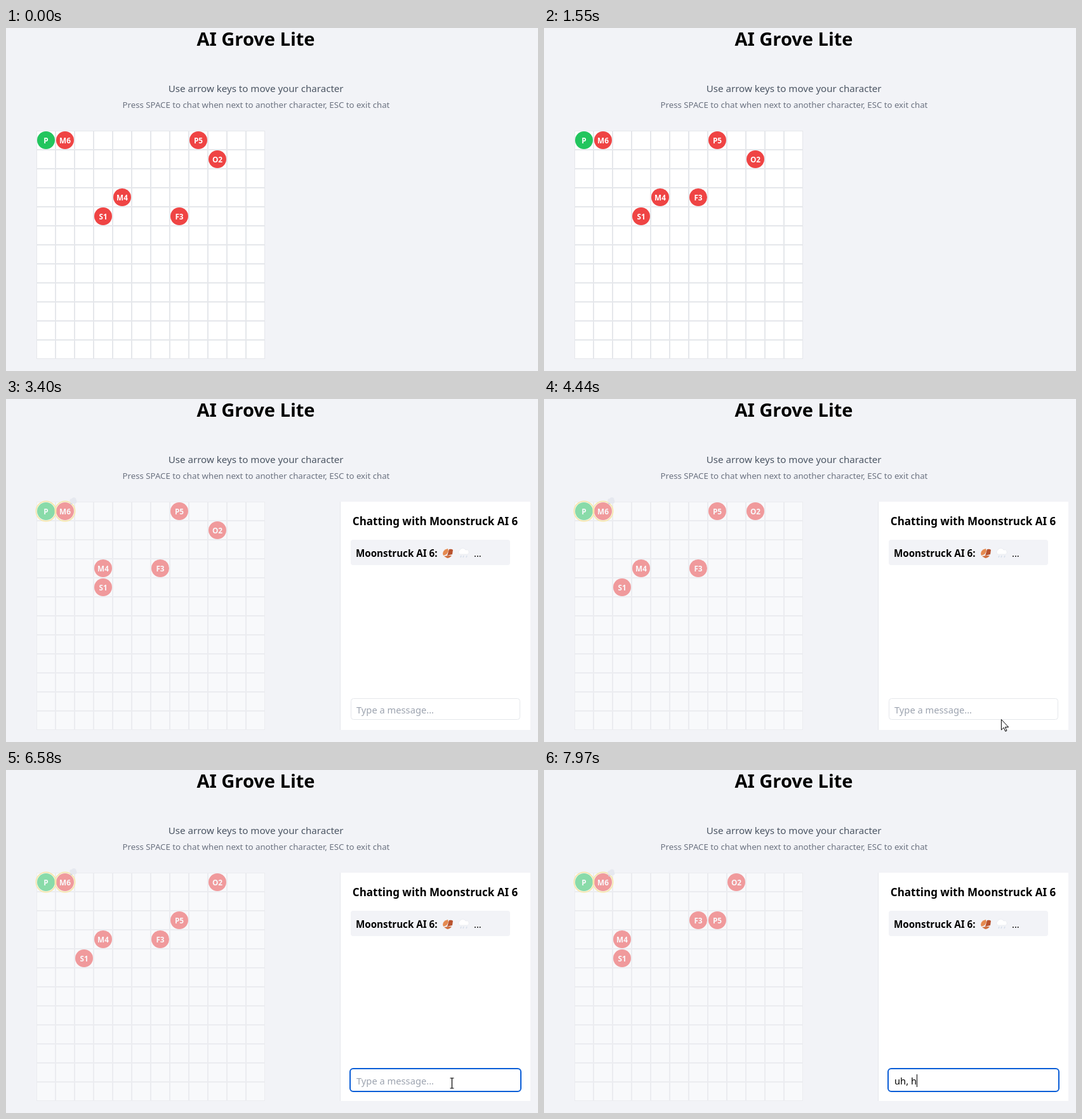
Write an HTML page that moves like this. It is 838 px wide and 541 px high and loops after 8000 ms.

```html
<!DOCTYPE html>
<html lang="en">
<head>
<meta charset="utf-8">
<style>
  html, body { margin: 0; width: 100%; height: 100%; overflow: hidden; background: #f2f3f7; }
  svg { display: block; width: 838px; height: 541px; font-family: "Noto Sans", "Open Sans", sans-serif; }
  text { white-space: pre; }
  .mid { text-anchor: middle; }
  .bold { font-weight: 700; }
</style>
</head>
<body>
<svg viewBox="0 0 838 541">
  <text class="mid bold" x="393.5" y="28" font-size="29">AI Grove Lite</text>
  <text class="mid" x="393.7" y="101" font-size="15.1" fill="#4b5563">Use arrow keys to move your character</text>
  <text class="mid" x="394" y="126" font-size="13.22" fill="#6b7280">Press SPACE to chat when next to another character, ESC to exit chat</text>

  <g id="board">
    <rect x="48.5" y="162.5" width="359" height="359" fill="#fff" stroke="#e5e7eb"/>
    <path id="lines" stroke="#e5e7eb" stroke-width="2"/>
    <rect id="glow" x="79" y="163" width="28" height="28" fill="#b9d2f5"/>
    <g id="people"></g>
    <g id="rings" fill="none" stroke="#fddd60" stroke-width="1.8">
      <circle cx="63" cy="177" r="15.6"/>
      <circle cx="93" cy="177" r="15.6"/>
    </g>
    <g id="thought" fill="#dcdfe8">
      <circle cx="103.5" cy="160" r="3.2"/>
      <circle cx="107" cy="158.5" r="3.6"/>
      <circle cx="108.5" cy="161.5" r="3"/>
      <circle cx="105" cy="162" r="3"/>
      <circle cx="102.5" cy="165" r="1.4" fill="#b4b8c4"/>
    </g>
  </g>

  <g id="chat">
    <rect x="527" y="162" width="299" height="360" fill="#fff"/>
    <path d="M526.5 162v360" stroke="#e5e7eb"/>
    <text class="mid bold" x="676" y="199" font-size="17">Chatting with Moonstruck AI 6</text>
    <rect x="543" y="222" width="251" height="40" rx="4" fill="#f2f3f7"/>
    <text class="bold" x="551" y="249" font-size="15.2">Moonstruck AI 6:</text>
    <path d="M688 244q0-6 8-8l1 4-3 5-5 2z" fill="#e58a50"/>
    <path d="M698 237q4-1 6 1l-1 7-8 2z" fill="#b9532e"/>
    <path d="M690 248l6-1 6 0q-3 4-7 4z" fill="#d0703f"/>
    <path d="M715 245a4 4 0 0 1 0-7 5 5 0 0 1 9 0 3.6 3.6 0 0 1 3 7z" fill="#fff" stroke="#e4e7ed" stroke-width=".7"/>
    <path d="M717 247l-1 3m5-3l-1 3m6-3l-1 3" stroke="#d5dfea" stroke-width="1.4"/>
    <text x="737" y="249" font-size="14.7">...</text>
    <rect id="field" fill="#fff"/>
    <text id="typed" x="552" y="496" font-size="14.7"></text>
    <path id="caret" d="M0 480v20" stroke="#000"/>
  </g>

  <path id="arrow" d="M0 .5v16.5l3.8-3.6 2.6 5.8 2.2-1-2.5-5.6h5.2z" fill="#fff" stroke="#000"/>
  <path id="beam" d="M-3-8h2.5l.5.5.5-.5H3M0-7.5v15M-3 8h2.5l.5-.5.5.5H3" fill="none" stroke="#000" stroke-width="1.2"/>
</svg>
<script>
const LOOP = 8000, CHAT = 2610, FOCUS = 4990, BLINK = 530;
const $ = id => document.getElementById(id);
const set = (el, attrs) => { for (const k in attrs) el.setAttribute(k, attrs[k]); };
const show = (id, on) => { $(id).style.display = on ? '' : 'none'; };
const clamp = v => Math.min(1, Math.max(0, v));

// column, row on the board
const start = { P: [0, 0], M6: [1, 0], P5: [8, 0], O2: [9, 1], M4: [4, 3], S1: [3, 4], F3: [7, 4] };
const moves = [
  [540, 'P5', 7, 0], [540, 'F3', 6, 4], [1550, 'F3', 6, 3], [2610, 'M4', 3, 3],
  [3620, 'O2', 9, 0], [3620, 'S1', 2, 4], [4670, 'P5', 7, 1], [5630, 'P5', 7, 2],
  [6730, 'O2', 8, 0], [7680, 'M4', 2, 3], [7680, 'F3', 6, 2]
];
const keys = [[7170, 'u'], [7310, 'h'], [7680, ','], [7830, ' '], [7900, 'h']];
const pointer = [[3850, 772.5, 541], [4440, 720.5, 505], [4590, 704, 496], [4740, 702.5, 494]];

let grid = '';
for (let i = 1; i < 12; i++) grid += `M${48 + i * 30} 162v360M48 ${162 + i * 30}h360`;
set($('lines'), { d: grid });

$('people').innerHTML = Object.keys(start).map(name =>
  `<g id="${name}"><circle r="14" fill="${name === 'P' ? '#22c55e' : '#ef4444'}"/>
   <text class="mid bold" y="4.5" font-size="11.8" fill="#fff">${name}</text></g>`).join('');

function pointerAt(t) {
  for (let i = 1; i < pointer.length; i++) {
    const [t0, x0, y0] = pointer[i - 1], [t1, x1, y1] = pointer[i];
    if (t < t1) {
      const k = clamp((t - t0) / (t1 - t0));
      return [x0 + (x1 - x0) * k, y0 + (y1 - y0) * k];
    }
  }
  return pointer[pointer.length - 1].slice(1);
}

function drawPeople(t) {
  const place = { ...start };
  for (const [at, name, col, row] of moves) if (t >= at) place[name] = [col, row];
  for (const name in place) {
    const [col, row] = place[name];
    set($(name), { transform: `translate(${63 + col * 30} ${177 + row * 30})` });
  }
}

function drawChat(t) {
  const open = t >= CHAT, focused = t >= FOCUS;
  for (const id of ['chat', 'glow', 'rings', 'thought']) show(id, open);
  set($('board'), { opacity: open ? 0.5 : 1 });
  const fade = clamp((t - CHAT - 40) / 240);
  set($('glow'), { opacity: 1 - fade });
  set($('rings'), { opacity: fade });

  const phase = (t - CHAT + LOOP) % 1000 / 1000;
  const drop = 4 * (1 - Math.abs(2 * phase - 1)) ** 2.8;
  set($('thought'), { transform: `translate(0 ${drop})` });

  set($('field'), focused
    ? { x: 542, y: 471, width: 269, height: 36, rx: 5, stroke: '#0b5ed7', 'stroke-width': 2 }
    : { x: 543.5, y: 472.5, width: 266, height: 33, rx: 4, stroke: '#e5e7eb', 'stroke-width': 1 });

  const hit = keys.filter(k => t >= k[0]);
  const text = hit.map(k => k[1]).join('');
  $('typed').textContent = text || 'Type a message...';
  set($('typed'), { fill: text ? '#000' : '#9ca3af' });
  const since = t - (text ? hit[hit.length - 1][0] : FOCUS);
  show('caret', focused && Math.floor(since / BLINK) % 2 === 0);
  const width = text && open ? $('typed').getComputedTextLength() : 0;
  set($('caret'), { transform: `translate(${Math.round(552 + width) + 0.5} 0)` });
}

function drawPointer(t) {
  const [x, y] = pointerAt(t), over = t >= 4500;
  show('arrow', t >= pointer[0][0] && !over);
  show('beam', over && t < keys[0][0]);
  set($(over ? 'beam' : 'arrow'), { transform: `translate(${x} ${y})` });
}

function frame(now) {
  const t = now % LOOP;
  drawPeople(t);
  drawChat(t);
  drawPointer(t);
}

const begin = performance.now();
function tick() {
  frame(performance.now() - begin);
  requestAnimationFrame(tick);
}
tick();
</script>
</body>
</html>
```
